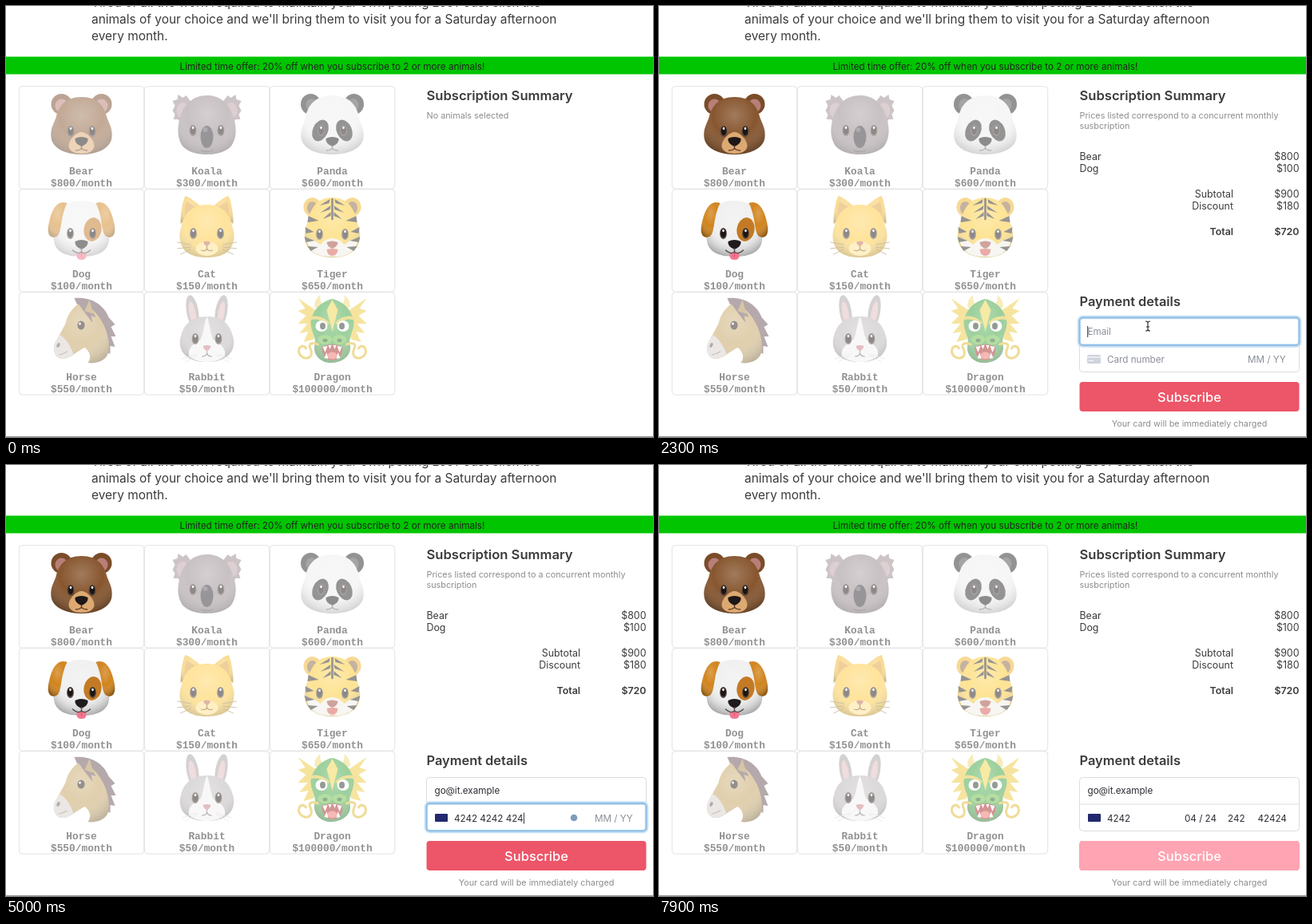
These frames come from a looping animation (810x540 px, 8000 ms). An HTML page:

```html
<!DOCTYPE html>
<html lang="en">
<head>
<meta charset="utf-8">
<title>Animal subscriptions</title>
<style>
html, body { margin: 0; width: 100%; height: 100%; overflow: hidden; background: #fff; }
svg { display: block; width: 810px; height: 540px; font-family: Inter, "Noto Sans", sans-serif; }
text { white-space: pre; }
.mono { font-family: "Liberation Mono", monospace; font-weight: 700; }
</style>
</head>
<body>
<svg id="stage" viewBox="0 0 810 540"></svg>
<script>
const LOOP = 8000;
const INK = '#3b3b3b', GREY = '#8c8c8c', HINT = '#8a8f98';

// Drawing helpers
const E = (x, y, rx, ry, fill, turn = 0) =>
  `<ellipse cx="${x}" cy="${y}" rx="${rx}" ry="${ry}" fill="${fill}" transform="rotate(${turn} ${x} ${y})"/>`;
const P = (d, fill, stroke = 'none', w = 1) =>
  `<path d="${d}" fill="${fill}" stroke="${stroke}" stroke-width="${w}" stroke-linecap="round" stroke-linejoin="round"/>`;
const L = (d, stroke, w) => P(d, 'none', stroke, w);
const R = (x, y, w, h, fill, more = '') =>
  `<rect x="${x}" y="${y}" width="${w}" height="${h}" fill="${fill}" ${more}/>`;
const T = (x, y, size, str, fill = INK, more = '') =>
  `<text x="${x}" y="${y}" font-size="${size}" fill="${fill}" ${more}>${str}</text>`;
const G = (id, inner, more = '') => `<g id="${id}" ${more}>${inner}</g>`;
const both = s => s + `<g transform="scale(-1 1)">${s}</g>`;
const shaded = (d, fill) => P(d, fill) + P(d, 'url(#shade)');
const eyes = (x, y) => both(E(x, y, 4.4, 7, '#54453f') + E(x, y - .5, 3.2, 5.6, '#1b1513') + E(x, y - 3.5, 1.3, 1.7, '#fff'));
const END = 'text-anchor="end"', MID = 'text-anchor="middle"', BOLD = 'font-weight="600"';

const HEAD = 'M0-34C20-34 29-22 32-8C35 0 39 6 38 16C37 31 18 38 0 38S-37 31-38 16C-39 6-35 0-32-8C-29-22-20-34 0-34Z';
const MUZZLE = 'M0 10C7 10 16 20 16 27C16 34 8 37 0 37S-16 34-16 27C-16 20-7 10 0 10Z';
const NOSE = 'M-8 18Q0 14 8 18Q9 24 0 28Q-9 24-8 18Z';
const SMILE = 'M0 28V31M-7 33Q-2 33 0 30Q2 33 7 33';

const art = {
  bear: both(E(-25, -25, 13, 13, '#7a4c2a') + E(-25, -23, 8, 8.5, '#b87f78')) +
    shaded(HEAD, '#87562f') + P(MUZZLE, '#dca972') + eyes(-13.5, 9) + P(NOSE, '#1d1717') + L(SMILE, '#5a3520', 1.3),

  koala: both(P('M-20-28L-26-36L-30-33L-36-37L-37-31L-43-29L-40-23L-43-17L-40-12L-42-6L-36-6L-32 1L-22-4Z', '#9b8b8f') +
      E(-30, -17, 8, 10, '#bfa2a6')) +
    shaded('M0-36C18-36 30-24 34-6C38 8 36 20 30 28C22 36 10 38 0 38S-22 36-30 28C-36 20-38 8-34-6C-30-24-18-36 0-36Z', '#93858a') +
    eyes(-17.5, 8) + E(0, 16, 8, 14, '#332e34') + E(-2, 7, 3, 3, '#625b62') + L('M-7 33Q0 36 7 33', '#5c4d50', 1.3),

  panda: both(E(-27, -25, 12.5, 13, '#2a2a2c') + E(-26, -24, 7, 8, '#4e4e52')) +
    shaded('M0-36C24-36 32-20 34-6C37 2 40 8 39 17C37 32 18 38 0 38S-37 32-39 17C-40 8-37 2-34-6C-32-20-24-36 0-36Z', '#eeeeee') +
    both(E(-15, 8, 9.5, 14, '#2c2c2e', 24)) + eyes(-14, 8) + P(NOSE, '#1d1b1d') + L(SMILE, '#666', 1.3),

  dog: shaded('M0-33C20-33 28-24 31-8C35 2 36 10 34 20C30 34 14 37 0 37S-30 34-34 20C-36 10-35 2-31-8C-28-24-20-33 0-33Z', '#f0f0f0') +
    both(shaded('M-18-30C-31-35-38-20-41-4C-44 10-38 16-30 11C-24 4-27-12-18-30Z', '#d1841d')) +
    E(14, 3, 11, 15, '#c47a24', 10) + eyes(-14, 8) +
    P('M-6 32H6V36Q6 41 0 41T-6 36Z', '#f2768f') + L('M0 32V37', '#cf5570', 1) +
    P(NOSE, '#201b1d') + L('M0 27V31M-11 29Q-4 35 0 31Q4 35 11 29', '#55494a', 1.4),

  cat: both(shaded('M-33-4C-33-18-30-34-27-39C-20-37-11-29-6-24Z', '#f5b92b') + P('M-28-12C-28-22-27-29-25-32L-14-25Z', '#e0a03a')) +
    shaded('M0-28C20-28 29-16 32 0C36 10 34 22 27 30C19 37 8 38 0 38S-19 37-27 30C-34 22-36 10-32 0C-29-16-20-28 0-28Z', '#ffc93a') +
    E(0, 27, 14, 9, '#ffe08c') + eyes(-17, 8) + P('M-4.5 19Q0 16.500 4.500 19Q3 23 0 24Q-3 23-4.500 19Z', '#c26b54') +
    L('M0 24V27M-7 29Q-2 31 0 27Q2 31 7 29', '#8a5a1e', 1.2) +
    both(L('M-20 22L-37 19M-20 25L-37 27M-20 28L-33 34', '#9a8146', .9)),

  tiger: both(E(-25, -25, 11, 12, '#f0b52c') + E(-25, -24, 6.5, 8, '#8b6a45')) +
    shaded('M0-37C20-37 28-22 31-6C36 6 36 18 30 26C22 36 10 38 0 38S-22 36-30 26C-36 18-36 6-31-6C-28-22-20-37 0-37Z', '#fdc92c') +
    both(P('M-33 14C-26 14-20 18-15 22C-10 16-5 14 0 14V37C-14 38-29 34-33 14Z', '#f1eee6') +
      P('M-34 0L-23 6L-33 8ZM-35 12L-22 17L-33 19ZM-31 24L-18 25L-27 30Z', '#302a26') +
      P('M-30-14L-17-8L-31-6ZM-3-35L-16-27L-4-30ZM-2-27L-15-18L-3-22ZM-2-19L-12-10L-2-14Z', '#302a26')) +
    L('M0-35V-10', '#302a26', 2.6) + eyes(-16, 9) +
    P('M-7 28Q0 26 7 28Q6 36 0 36Q-6 36-7 28Z', '#d6594f') + P('M-7 19Q0 16 7 19Q7 24 0 27Q-7 24-7 19Z', '#a04a3c'),

  horse: P('M-9-40C12-42 28-32 34-16L42-7L37-4L43 8L37 8L42 21L36 20L36 30C18 20 16-12-2-24Z', '#6d555c') +
    shaded('M-2-34C-12-28-18-18-20-8L-33 16C-37 26-32 37-22 36C-14 35-6 27 4 22C12 28 12 36 8 41C20 43 32 37 34 27C37 4 22-28-2-34Z', '#c3a05c') +
    P('M-27 6L-33 16C-37 26-32 37-22 36C-17 35-13 32-10 30C-13 22-18 12-27 6Z', '#d9d1cc') +
    P('M-9-40C2-38 12-30 18-16L12-18L14-9L4-22Z', '#6d555c') + P('M4-24L10-38L15-20Z', '#b08e50') +
    E(-.5, -6, 4.6, 5.6, '#2b221e') + E(-2, -8, 1.4, 1.6, '#fff') + E(-29, 19, 1.8, 3, '#67565a', 25) + L('M-28 31Q-22 30-18 27', '#94847f', 1.2),

  rabbit: both(E(-18, -23, 7.5, 21, '#aaa5a7', -10) + E(-18, -21, 4, 15, '#e3bdbf', -10)) +
    shaded('M0-17C20-17 29-6 32 6C36 17 33 28 24 34C16 39 8 40 0 40S-16 39-24 34C-33 28-36 17-32 6C-29-6-20-17 0-17Z', '#b9b4b6') +
    P('M0-17C4-8 4 4 8 12C18 18 25 24 22 33C14 39 7 40 0 40S-14 39-22 33C-25 24-18 18-8 12C-4 4-4-8 0-17Z', '#f5f3f3') +
    eyes(-14.5, 11) + P('M-5 20Q0 18 5 20Q4 25 0 26Q-4 25-5 20Z', '#c97f87') +
    L('M0 26V30M-6 33Q-1 33 0 29Q1 33 6 33', '#7d7375', 1.2) + both(L('M-12 30L-31 36M-12 32L-27 40', '#d5d1d2', .8)),

  dragon: both(P('M-8-18L-24-27L-43-40L-34-27L-43-24L-33-18L-43-8L-31-8L-41 4L-30 2L-36 15L-24 12Z', '#eecb3f') +
      P('M-8-28C-14-33-16-37-15-44C-20-40-23-36-22-28Z', '#f1da74')) +
    shaded('M0-39C12-36 24-28 27-10C27 2 20 8 22 18C25 30 15 40 0 41S-25 30-22 18C-20 8-27 2-27-10C-24-28-12-36 0-39Z', '#3aa23c') +
    P('M0-38L7-25L3-10L0 2L-3-10L-7-25Z', '#efd64c') + both(L('M-26-15Q-15-17-6-9', '#e3c73d', 4) +
      E(-13.5, -5, 7.5, 7, '#fff') + E(-12, -5, 3.5, 4.2, '#2b3a2b') +
      E(-9, 12, 9, 6, '#6cbc45') + E(-9, 13, 3, 2.2, '#245f2b') +
      L('M-18 18C-25 15-30 17-28 22C-20 38-40 39-42 27C-42 20-36 18-33 23', '#e3ba35', 3)) +
    P('M-13 21Q0 15 13 21Q13 37 0 38Q-13 37-13 21Z', '#a92d2a') + E(0, 32, 6, 4.5, '#ef7367') +
    both(P('M-12 21L-9 28L-6 20ZM-5 19L-3 24L-1 19ZM-10 35L-7 28L-5 36Z', '#fff'))
};

const animals = [['Bear', 800], ['Koala', 300], ['Panda', 600], ['Dog', 100], ['Cat', 150], ['Tiger', 650],
  ['Horse', 550], ['Rabbit', 50], ['Dragon', 100000]];

const cell = ([name, price], i) => {
  const key = name.toLowerCase(), x = 94.5 + 157 * (i % 3), y = 148 + 129 * (i / 3 | 0);
  return R(x - 78.2, y - 47.3, 156.4, 128.4, 'none', 'rx="4" stroke="#e3e3e3"') +
    G(key, art[key], `transform="translate(${x} ${y})" opacity=".5"`) +
    T(x, y + 63, 12.85, name, '#919191', MID + ' class="mono"') +
    T(x, y + 77.5, 12.85, `$${price}/month`, '#919191', MID + ' class="mono"');
};

const row = (y, name, price, more = '') =>
  T(name.length > 4 || more ? 719 : 526.5, y, 12.4, name, INK, (name.length > 4 || more ? END : '') + more) +
  T(801.5, y, 12.4, '$' + price, INK, END + more);
const ring = (id, y) => G(id, R(526, y, 276, 35.5, 'none', 'rx="4.5" stroke="#c3def3" stroke-width="4.5"') +
  R(526.5, y + .5, 275, 34.5, 'none', 'rx="4" stroke="#85b7e2" stroke-width="1.4"'));
const field = (id, x, y) => T(x, y, 11.65, '', HINT, `id="${id}"`);

const stage = document.getElementById('stage');
stage.innerHTML = `<defs>
  <radialGradient id="shade" cx=".5" cy=".32" r=".72">
    <stop offset="0" stop-color="#fff" stop-opacity=".22"/><stop offset=".5" stop-color="#fff" stop-opacity="0"/>
    <stop offset="1" stop-color="#000" stop-opacity=".34"/></radialGradient>
  <clipPath id="slot">${R(560.5, 428, 150, 28, '#000')}</clipPath></defs>` +
  T(107, .8, 15.45, 'Tired of all the work required to maintain your own petting zoo? Just click the') +
  T(107, 22, 15.45, "animals of your choice and we'll bring them to visit you for a Saturday afternoon") +
  T(107, 43.4, 15.45, 'every month.') +
  R(0, 63.5, 810, 22, '#00c500') +
  T(408.5, 79.5, 11.7, 'Limited time offer: 20% off when you subscribe to 2 or more animals!', '#222', MID) +
  animals.map(cell).join('') +
  T(526.5, 118, 16.6, 'Subscription Summary', INK, BOLD) +
  G('none', T(526.5, 141, 10.8, 'No animals selected', GREY)) +
  G('summary',
    T(526.5, 141, 10.8, 'Prices listed correspond to a concurrent monthly', GREY) +
    T(526.5, 154, 10.8, 'susbcription', GREY) + row(193, 'Bear', 800) +
    G('single', row(225, 'Total', 800, BOLD.padStart(20))) +
    G('pair', row(207.6, 'Dog', 100) + row(240, 'Subtotal', 900) + row(254.5, 'Discount', 180) +
      row(286.5, 'Total', 720, BOLD.padStart(20))) +
    G('pay', T(526.5, 375.5, 16.4, 'Payment details', INK, BOLD) +
      G('form', R(526.5, 391.5, 275, 67, '#fff', 'rx="4" stroke="#d9dce1"') + L('M526.5 425H801.500', '#d9dce1', 1) +
        ring('mailRing', 390) + ring('cardRing', 423.5) + field('mail', 536.5, 412.3) +
        G('blank', R(536, 437, 17, 11, '#cfd3dc', 'rx="1.5"') + R(536, 439, 17, 2, '#e9ebf0') + R(538, 443.5, 6, 1.5, '#f3f4f7')) +
        G('brand', R(537, 437, 16, 10, '#22296f', 'rx="1"')) +
        G('slotBox', field('num', 561, 446.5), 'clip-path="url(#slot)"') +
        G('helper', E(711, 442, 4.3, 4.3, '#7d9dbb')) +
        field('exp', 737, 446.5) + field('cvc', 712, 446.5) + field('zip', 749.5, 446.5) +
        R(0, 0, 1, 14, '#333', 'id="caret"')) +
      R(526.5, 471, 275, 37, '#ed5568', 'rx="4"') + R(526.5, 471, 275, 37, '#ffa4b2', 'rx="4" id="busy"') +
      T(664, 495.5, 16.5, 'Subscribe', '#fff', MID + ' font-weight="500"') +
      T(664, 527, 10.8, 'Your card will be immediately charged', GREY, MID))) +
  R(0, 539, 810, 1, '#9b9b9b') +
  G('pointer',
    G('hand', P('M-1.500 0Q0-1.500 1.300 0V5L7 6.300Q8.500 7 8 9.500L6.800 14H-.5L-5 8.500Q-5-.5-5 8Q-4 6.300-1.500 8.500Z', '#fff', '#222') +
      L('M3.300 6V8.500M5.500 6.500V8.800', '#222', .8)) +
    G('arrow', P('M0 0V13L3 10.300L5 15L7 14L5 9.600H9Z', '#111', '#fff')) +
    G('beam', L('M-2.500-6Q0-6 0-4Q0-6 2.500-6M0-4V4M-2.500 6Q0 6 0 4Q0 6 2.500 6M-1.500 1H1.500', '#222', 1.1)));

const $ = Object.fromEntries([...stage.querySelectorAll('[id]')].map(el => [el.id, el]));
const show = (id, on) => { $[id].style.display = on ? '' : 'none'; };
const fade = (id, v) => $[id].setAttribute('opacity', v);
const clamp = v => Math.min(1, Math.max(0, v));
const ease = v => v * v * (3 - 2 * v);
const write = (id, str, hint) => {
  $[id].textContent = str || hint;
  $[id].setAttribute('fill', str ? '#2b2b33' : HINT);
};

const MAIL = 'go@it.example';
const BEAR = 1000, FORM = 1300, DOG = 1600, FOLD = 5500, BLUR = 7100;
// time, x, y
const path = [[100, 430, 550], [800, 101, 173], [1100, 101, 173], [1500, 100, 296], [1700, 100, 296], [2100, 612, 401], [2500, 612, 401]];

function placePointer(t) {
  const on = t >= 100 && t < 2500;
  show('pointer', on);
  if (!on) return;
  const i = path.findIndex(p => p[0] > t) - 1;
  const [t0, x0, y0] = path[i], [t1, x1, y1] = path[i + 1];
  const k = ease((t - t0) / (t1 - t0)), x = x0 + (x1 - x0) * k, y = y0 + (y1 - y0) * k;
  $.pointer.setAttribute('transform', `translate(${x} ${y})`);
  const hand = x > 16 && x < 487 && y > 101 && y < 488, beam = x > 527 && y > 391 && y < 459;
  show('hand', hand);
  show('beam', beam);
  show('arrow', !hand && !beam);
}

function mailKeys(t) {
  if (t < 2500) return 0;
  if (t < 2900) return Math.min(3, (t - 2400) / 100 | 0);
  return t < 3100 ? 4 : Math.min(13, 5 + ((t - 3100) / 75 | 0));
}

function drawForm(t) {
  const mailOn = t >= 2100 && t < 3800, cardOn = t >= 3800 && t < BLUR;
  fade('mailRing', mailOn ? clamp((t - 2100) / 200) : 0);
  fade('cardRing', cardOn ? clamp((t - 3800) / 200) : 0);
  write('mail', MAIL.slice(0, mailKeys(t)), 'Email');

  const digits = t < 4100 ? 0 : Math.min(16, 1 + ((t - 4100) / 90 | 0));
  const keys = t < 5550 ? 0 : Math.min(12, 1 + ((t - 5550) / 75 | 0));
  const fold = ease(clamp((t - FOLD + 100) / 300)) * (t >= FOLD);
  write('num', '4242424242424242'.slice(0, digits).replace(/(.{4})(?=.)/g, '$1 '), 'Card number');
  const shift = fold ? $.num.getSubStringLength(0, 15) * fold : 0;
  $.num.setAttribute('x', 561 - shift);
  show('blank', !digits);
  show('brand', digits);
  show('helper', t >= 3800 && t < FOLD);

  const date = '0424'.slice(0, keys);
  write('exp', keys < 2 ? date : date.slice(0, 2) + ' / ' + date.slice(2), 'MM / YY');
  $.exp.setAttribute('x', 737 - 79 * fold);
  write('cvc', '242'.slice(0, Math.max(0, keys - 4)), 'CVC');
  write('zip', '42424'.slice(0, Math.max(0, keys - 7)), 'ZIP');
  fade('cvc', fold);
  fade('zip', fold);

  show('caret', mailOn || cardOn);
  const [id, typed] = mailOn ? ['mail', mailKeys(t)] : t < FOLD ? ['num', digits] :
    keys < 4 ? ['exp', keys] : keys < 7 ? ['cvc', keys - 4] : ['zip', keys - 7];
  const x = +$[id].getAttribute('x') + (typed ? $[id].getComputedTextLength() + .3 : -.3);
  $.caret.setAttribute('x', x);
  $.caret.setAttribute('y', mailOn ? 401 : 435.5);
}

function draw(t) {
  const bear = t >= BEAR, dog = t >= DOG;
  fade('bear', bear ? 1 : .5);
  fade('dog', dog ? 1 : .5);
  show('none', !bear);
  show('summary', bear);
  show('single', !dog);
  show('pair', dog);
  $.pay.setAttribute('transform', `translate(0 ${dog ? 0 : -61})`);
  show('form', t >= FORM);
  if (t >= FORM) drawForm(t);
  fade('busy', clamp((t - 7600) / 300));
  placePointer(t);
}

const start = performance.now();
function tick() {
  const t = (performance.now() - start) % LOOP;
  draw(Math.floor(t / 100) * 100);
  requestAnimationFrame(tick);
}
tick();
</script>
</body>
</html>
```
